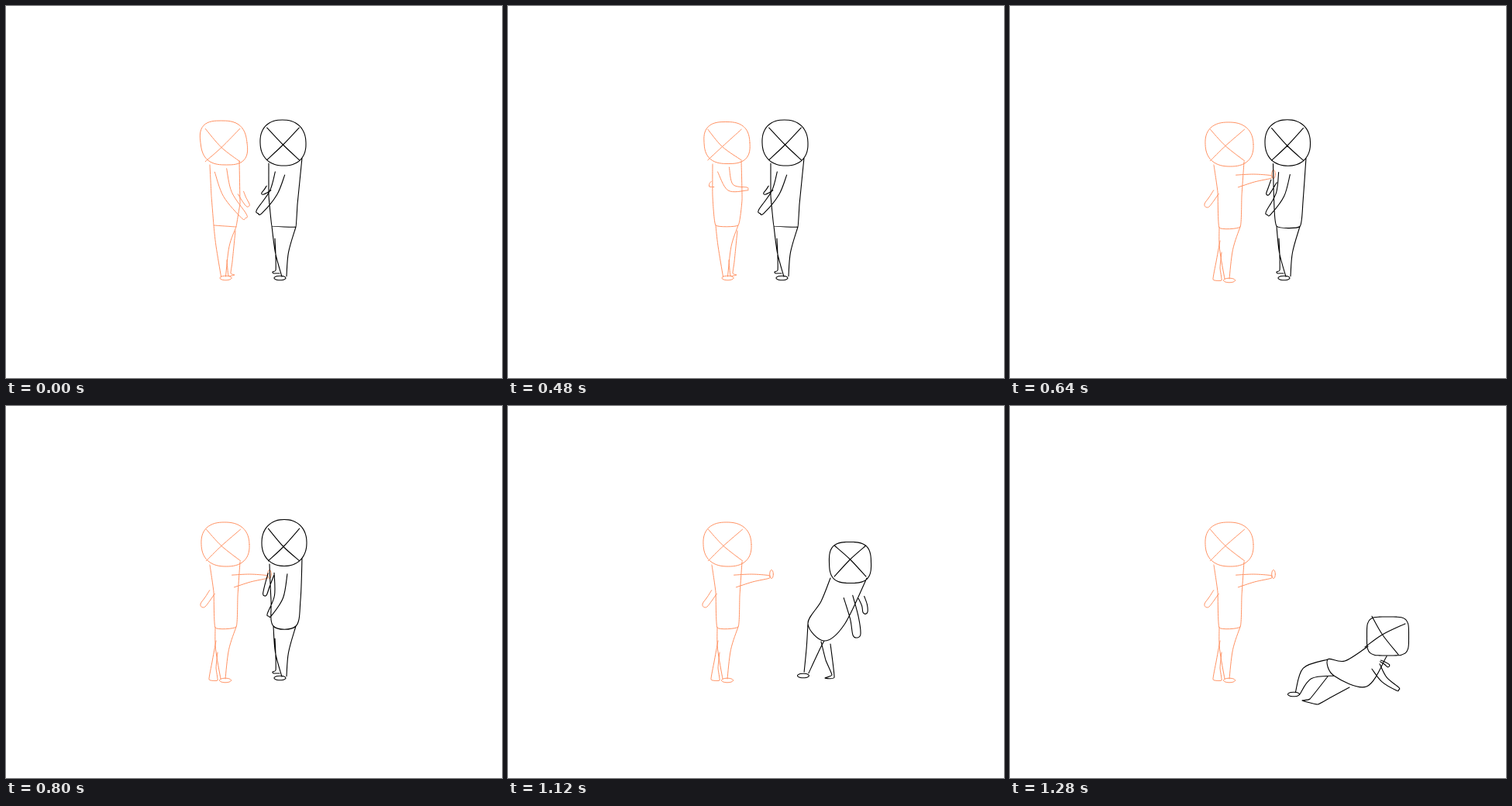
These frames come from a looping animation (640x480 px, 1680 ms). An HTML page:

```html
<!DOCTYPE html>
<html lang="en">
<head>
<meta charset="utf-8">
<title>Push</title>
<style>
  html, body { margin: 0; width: 100%; height: 100%; overflow: hidden; background: #fff; }
  svg { display: block; width: 640px; height: 480px; }
  path { fill: none; stroke-linecap: round; stroke-linejoin: round; }
</style>
</head>
<body>
<svg viewBox="0 0 640 480">
  <path id="pusher" stroke="#ff9263"/>
  <path id="victim" stroke="#000" stroke-width="1.1"/>
</svg>
<script>
const LOOP = 1680;

// Poses are skeletons: head (centre, radii, squareness, shear), cross knot,
// torso outline, joints and half-widths of the arms, near knee and ankle, far leg.
const waiting = {
  head: { at: [281, 176.5], size: [30, 28.5], square: 2.8, shear: 0.12, knot: [-3, 6], turn: 0 },
  torso: [[263, 205], [265, 245], [268, 283], [297, 285], [302, 255], [301, 200]],
  soft: 0,
  arm: { joints: [[277, 212], [286, 243], [307, 271]], width: [8, 4] },
  backArm: { joints: [[303, 241], [307, 249], [312, 257]], width: [4, 2.5] },
  knee: [279.5, 310], ankle: [280.5, 349], toe: [3, 2],
  farLeg: [[296, 290], [292, 330], [290, 345], [295, 347], [287, 348], [285, 328]]
};

const windUp = {
  ...waiting,
  arm: { joints: [[278, 213], [267, 239], [286, 251]], width: [7.5, 2] },
  backArm: { joints: [[301, 263], [301, 267], [300, 271]], width: [0.5, 0.5] }
};

const reach = {
  ...waiting,
  head: { at: [282.5, 176.5], size: [29.5, 27], square: 2.7, shear: 0.06, knot: [-6, 5], turn: 0 },
  torso: [[264, 204], [264, 245], [268, 283], [297, 283], [302, 250], [301, 200]],
  soft: 0.4,
  arm: { joints: [[278, 211], [287, 234], [308, 236]], width: [8, 2] },
  backArm: { joints: [[264, 230], [262, 231], [261, 232]], width: [4, 2] }
};

const thrust = {
  ...reach,
  head: { at: [280.5, 178], size: [31, 29], square: 2.6, shear: 0.05, knot: [-1, 5], turn: 0 },
  torso: [[263, 206], [264, 240], [268, 284], [297, 285], [301, 245], [302, 203]],
  arm: { joints: [[285, 225.5], [305, 226], [324, 224]], width: [7.5, 4] },
  backArm: { joints: [[263, 227], [261, 232], [259, 237]], width: [3, 2] },
  farLeg: [[288, 320], [286, 335], [285, 347], [287, 349], [284, 348], [285, 330]],
  speedLines: true
};

const pushed = {
  ...reach,
  head: { at: [283, 178.5], size: [31, 28.5], square: 2.4, shear: 0.04, knot: [-5, 2], turn: 0 },
  torso: [[263, 205], [268, 240], [270, 286], [297, 285], [299, 245], [302, 201]],
  arm: { joints: [[293, 226], [315, 222], [336, 220.5]], width: [8, 2] },
  backArm: { joints: [[266, 240], [260, 249], [254, 257]], width: [4, 3.5] },
  knee: [279, 314], ankle: [280, 352],
  farLeg: [[271, 303], [266, 330], [262, 353], [273, 354], [271, 338], [273, 318]],
  palm: [340, 217]
};

const standing = {
  head: { at: [357.5, 176.5], size: [29.5, 29.5], square: 2.3, shear: 0.03, knot: [0, 2.5], turn: 0 },
  torso: [[339, 203], [339, 245], [343, 284], [374, 285], [376, 256], [382, 196]],
  soft: 0.1,
  arm: { joints: [[353.5, 216], [345, 241], [327, 265]], width: [6.5, 4] },
  backArm: { joints: [[339, 235], [335, 239], [331, 242]], width: [4, 1.5] },
  knee: [356, 318], ankle: [359, 349], toe: [-5.5, 2],
  farLeg: [[347, 300], [348, 322], [348, 341], [344, 343], [345, 345], [353, 345]]
};

const hit = {
  ...standing,
  head: { at: [359, 176.5], size: [29, 30], square: 2.2, shear: 0, knot: [-1, 5], turn: 0 },
  torso: [[340, 204], [342, 250], [345, 284], [374, 284], [380, 250], [382, 196]],
  soft: 1,
  arm: { joints: [[354.5, 216], [352, 246], [340, 269]], width: [8.5, 3] },
  backArm: { joints: [[342, 217], [337, 232], [334, 243]], width: [4, 2.5] }
};

const falling = {
  ...hit,
  head: { at: [441.5, 202], size: [27, 26.5], square: 3, shear: 0.02, knot: [0, -4], turn: 0 },
  torso: [[416, 222], [404, 252], [387, 281], [408, 303], [434, 282], [463, 222]],
  arm: { joints: [[439, 246], [447, 274], [450, 295]], width: [6, 5] },
  backArm: { joints: [[456, 247], [460, 257], [461, 266]], width: [4, 3] },
  knee: [393.5, 313], ankle: [385, 344], toe: [-4, 4],
  farLeg: [[404, 304], [410, 328], [418, 347], [409, 351], [421, 350], [416, 307]]
};

const fallen = {
  ...falling,
  head: { at: [487.5, 297], size: [27, 25], square: 4.5, shear: 0, knot: [-7, -2], turn: 0.22 },
  torso: [[462, 310], [432, 329], [410, 327], [418, 348], [460, 362], [486, 323]],
  arm: { joints: [[472, 336], [483, 353], [500, 365]], width: [6, 2.5] },
  backArm: { joints: [[478, 329], [484, 332], [488, 335]], width: [1, 2] },
  knee: [383.5, 345], ankle: [371, 371], toe: [-5, 1],
  farLeg: [[410, 349], [387, 378], [377, 380], [397, 385], [412, 377], [438, 363]]
};

function blend(a, b, k) {
  if (typeof a === 'number' && typeof b === 'number') return a + (b - a) * k;
  if (Array.isArray(a) && Array.isArray(b)) return a.map((v, i) => blend(v, b[i], k));
  if (a && b && typeof a === 'object') {
    const keys = Object.keys({ ...a, ...b });
    return Object.fromEntries(keys.map(key => [key, blend(a[key], b[key], k)]));
  }
  return k < 0.5 ? a : b;
}

const add = (p, q, k = 1) => [p[0] + q[0] * k, p[1] + q[1] * k];
const ring = count => Array.from({ length: count + 1 }, (_, i) => i / count * 2 * Math.PI);

function normal(from, to) {
  const [dx, dy] = add(to, from, -1), length = Math.hypot(dx, dy) || 1;
  return [dy / length, -dx / length];
}

// Curve through the points; softness 0 gives straight segments, 1 a Catmull-Rom spline.
function curve(points, soft = 1) {
  const at = i => points[Math.max(0, Math.min(points.length - 1, i))];
  const handle = (i, sign) => add(at(i), add(at(i + 1), at(i - 1), -1), sign * soft / 6);
  return 'M' + points[0] + points.slice(1).map(
    (p, i) => `C${handle(i, 1)} ${handle(i + 1, -1)} ${p}`).join('');
}

const ellipse = (at, rx, ry) =>
  curve(ring(12).map(a => add(at, [rx * Math.cos(a), ry * Math.sin(a)])));

function head({ at, size: [rx, ry], square, shear, knot, turn }) {
  const outline = ring(32).map(a => {
    const c = Math.cos(a), s = Math.sin(a);
    const r = (Math.abs(c) ** square + Math.abs(s) ** square) ** (-1 / square);
    return add(at, [c * r * rx + s * r * ry * shear, s * r * ry]);
  });
  const inset = 0.95 * 2 ** (-1 / square);
  const corner = (sx, sy) => {
    const x = sx * rx * inset, y = sy * ry * inset;
    const turned = [x * Math.cos(turn) - y * Math.sin(turn), x * Math.sin(turn) + y * Math.cos(turn)];
    return add(add(at, knot, 0.5), turned);
  };
  const chord = side => curve([corner(side, -1), add(at, knot), corner(-side, 1)]);
  return curve(outline) + chord(-1) + chord(1);
}

// Sleeve around three joints, open at the shoulder and rounded at the hand.
function arm({ joints: [shoulder, elbow, hand], width: [wide, thin] }) {
  const across = [normal(shoulder, elbow), normal(shoulder, hand), normal(elbow, hand)];
  const widths = [wide, (wide + thin) / 2, thin];
  const side = sign => [shoulder, elbow, hand].map((p, i) => add(p, across[i], sign * widths[i]));
  const [nx, ny] = across[2];
  const tip = add(hand, [-ny, nx], thin * 0.8);
  return curve([...side(-1), tip, ...side(1).reverse()]);
}

function leg(hips, knee, ankle) {
  const middle = blend(...hips, 0.5);
  const bend = normal(middle, ankle), end = normal(knee, ankle);
  return hips.map((hip, i) => {
    const sign = i ? 1 : -1;
    return curve([hip, add(knee, bend, sign * 8.5), add(ankle, end, sign * 3)]);
  }).join('');
}

function speedLines() {
  return [211, 215, 236, 239].map((y, i) => {
    const x = 313 + 2 * i;
    return curve([[x, y + 1], [x + 6, y - 1], [x + 12, y]]);
  }).join('');
}

const figure = pose => [
  head(pose.head),
  curve(pose.torso, pose.soft),
  arm(pose.arm),
  arm(pose.backArm),
  leg(pose.torso.slice(2, 4), pose.knee, pose.ankle),
  ellipse(add(pose.ankle, pose.toe), 7.5, 2.8),
  curve(pose.farLeg, 0.4),
  pose.palm ? ellipse(pose.palm, 2.3, 5.5) : '',
  pose.speedLines ? speedLines() : ''
].join('');

// The rear arm swaps sides at once, hidden by the body.
const turning = { ...windUp, backArm: reach.backArm };

const tracks = {
  pusher: [
    [0, waiting],
    [80, blend(waiting, windUp, 0.35)],
    [160, blend(waiting, windUp, 0.7)],
    [240, windUp],
    [360, blend(turning, reach, 0.35)],
    [440, blend(turning, reach, 0.7)],
    [480, reach],
    [520, blend(reach, thrust, 0.45)],
    [600, thrust],
    [640, pushed]
  ],
  victim: [
    [0, standing],
    [640, blend(standing, hit, 0.5)],
    [800, hit],
    [960, blend(hit, falling, 0.33)],
    [1040, blend(hit, falling, 0.67)],
    [1120, falling],
    [1200, blend(falling, fallen, 0.5)],
    [1280, fallen]
  ]
};

function draw(time) {
  const t = time % LOOP;
  for (const [id, steps] of Object.entries(tracks)) {
    const [, pose] = steps.filter(([start]) => start <= t).pop();
    document.getElementById(id).setAttribute('d', figure(pose));
  }
}

const begin = performance.now();
function tick() {
  draw(performance.now() - begin);
  requestAnimationFrame(tick);
}
tick();
</script>
</body>
</html>
```
